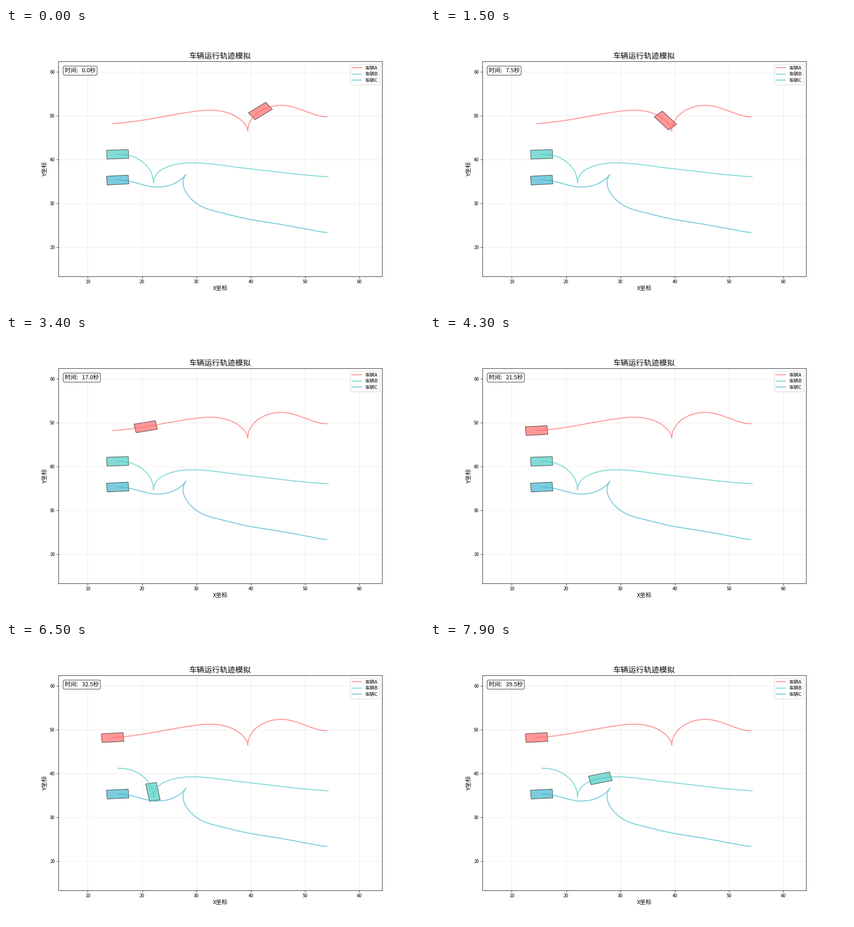
Animation, 917 px wide and 611 px high, one loop 8 s. Source, as a matplotlib script:

```python
import numpy as np
import matplotlib.pyplot as plt
from matplotlib.animation import FuncAnimation
from matplotlib.patches import Polygon

W, H, DPI = 917, 611, 76.4
FRAMES, STEP_MS = 80, 100
XLIM, YLIM = (4.57, 64.2), (13.4, 62.35)
CAR_L, CAR_W = 4, 2

plt.rcParams["font.family"] = "Noto Sans CJK JP"


def arc(p, q, n=120):
    """Arc-like cubic between two poses (x, y, heading in degrees)."""
    a, b = np.array(p[:2]), np.array(q[:2])
    turn = np.radians((q[2] - p[2] + 180) % 360 - 180)
    reach = np.hypot(*(b - a)) / np.cos(turn / 4) ** 2
    ma, mb = (reach * np.array([np.cos(h), np.sin(h)])
              for h in np.radians([p[2], q[2]]))
    t = np.linspace(0, 1, n)[:, None]
    xy = (a + (b - a) * t * t * (3 - 2 * t)
          + ma * t * (1 - t) ** 2 - mb * t * t * (1 - t))
    dx, dy = np.gradient(xy, axis=0).T
    return xy, np.arctan2(dy, dx)


def drive(*profile):
    """Distance covered by each frame for a piecewise linear speed profile."""
    fine = np.linspace(0, FRAMES, FRAMES * 20 + 1)
    speed = np.interp(fine, *zip(*profile))
    steps = (speed[1:] + speed[:-1]) / 40
    return np.r_[0, np.cumsum(steps)][::20]


class Car:
    def __init__(self, ax, name, color, before, after, dist):
        # before ends in the cusp, where the car changes gear
        x, y, h = before[-1]
        after = [(x, y, h + 180)] + after
        parts = [arc(p, q) for poses in (before, after)
                 for p, q in zip(poses, poses[1:])]
        self.xy = np.concatenate([xy for xy, _ in parts])
        self.angle = np.unwrap(np.concatenate([a for _, a in parts]),
                               period=np.pi)
        self.s = np.r_[0, np.cumsum(np.hypot(*np.diff(self.xy, axis=0).T))]
        self.dist = dist
        ax.plot(*self.xy.T, color=color, lw=2, alpha=0.7, label=name)
        self.body = ax.add_patch(Polygon(
            self.corners(0), fc=color, ec="black", lw=1, alpha=0.7))

    def corners(self, n):
        x, y, a = (np.interp(self.dist[n], self.s, v)
                   for v in (*self.xy.T, self.angle))
        along = np.array([np.cos(a), np.sin(a)]) * CAR_L / 2
        side = np.array([-np.sin(a), np.cos(a)]) * CAR_W / 2
        return np.array([x, y]) + [along + side, along - side,
                                   -along - side, -along + side]


fig = plt.figure(figsize=((W + 0.01) / DPI, (H + 0.01) / DPI), dpi=DPI)
ax = fig.add_axes([0.125, 0.11, 0.775, 0.77])
ax.set(xlim=XLIM, ylim=YLIM, xticks=range(10, 61, 10), yticks=range(20, 61, 10))
ax.tick_params(labelsize=9.3)
ax.grid(True, alpha=0.3)
ax.set_title("车辆运行轨迹模拟", fontsize=16)
fig.text(0.5125, 1 - 570.5 / H, "X坐标", size=12, ha="center", va="center")
fig.text(86 / W, 0.495, "Y坐标", size=12, rotation=90, ha="center",
         va="center", rotation_mode="anchor")

leave = drive((0, 0.54), (16, 0.54), (24, 0.85), (29, 1.37), (36, 1.37), (41, 0))
enter = drive((48.5, 0), (54, 0.67), (65, 0.67), (69, 0.35), (74, 0.63))

cars = [
    Car(ax, "车辆A", "#FF6B6B",
        [(14.57, 48.2, 3.7), (29, 50.85, 10), (32.7, 51.25, -1.5),
         (38.17, 49.03, -48), (39.45, 46.46, -90)],
        [(45.64, 52.35, 0), (50.5, 50.8, -24), (54.03, 49.77, 3)],
        leave[-1] - leave),
    Car(ax, "车辆B", "#4ECDC4",
        [(15.5, 41.2, 2.5), (22.1, 34.67, -90)],
        [(29.19, 39.26, 0), (38.33, 38.12, -8), (54.24, 36.08, -4)],
        enter),
    Car(ax, "车辆C", "#45B7D1",
        [(15.51, 35.33, 4), (22.81, 33.73, 0), (28.06, 36.63, 60)],
        [(29.94, 30.07, -43), (33.55, 28.2, -17), (41.52, 26.02, -10),
         (50.3, 24.15, -13), (54.03, 23.4, -4)],
        np.zeros(FRAMES + 1)),
]
ax.legend(loc="upper right", fontsize=10, labelspacing=0.34, handletextpad=0.65)
clock = ax.text(0.02, 0.95, "", transform=ax.transAxes, fontsize=12,
                bbox=dict(boxstyle="round,pad=0.27", facecolor="white", alpha=0.8))


def update(n):
    for car in cars:
        car.body.set_xy(car.corners(n))
    clock.set_text(f"时间:   {n * 0.5:.1f}秒")
    return [car.body for car in cars] + [clock]


anim = FuncAnimation(fig, update, frames=FRAMES, interval=STEP_MS,
                     repeat=True, repeat_delay=0, blit=False)
plt.show()
```
